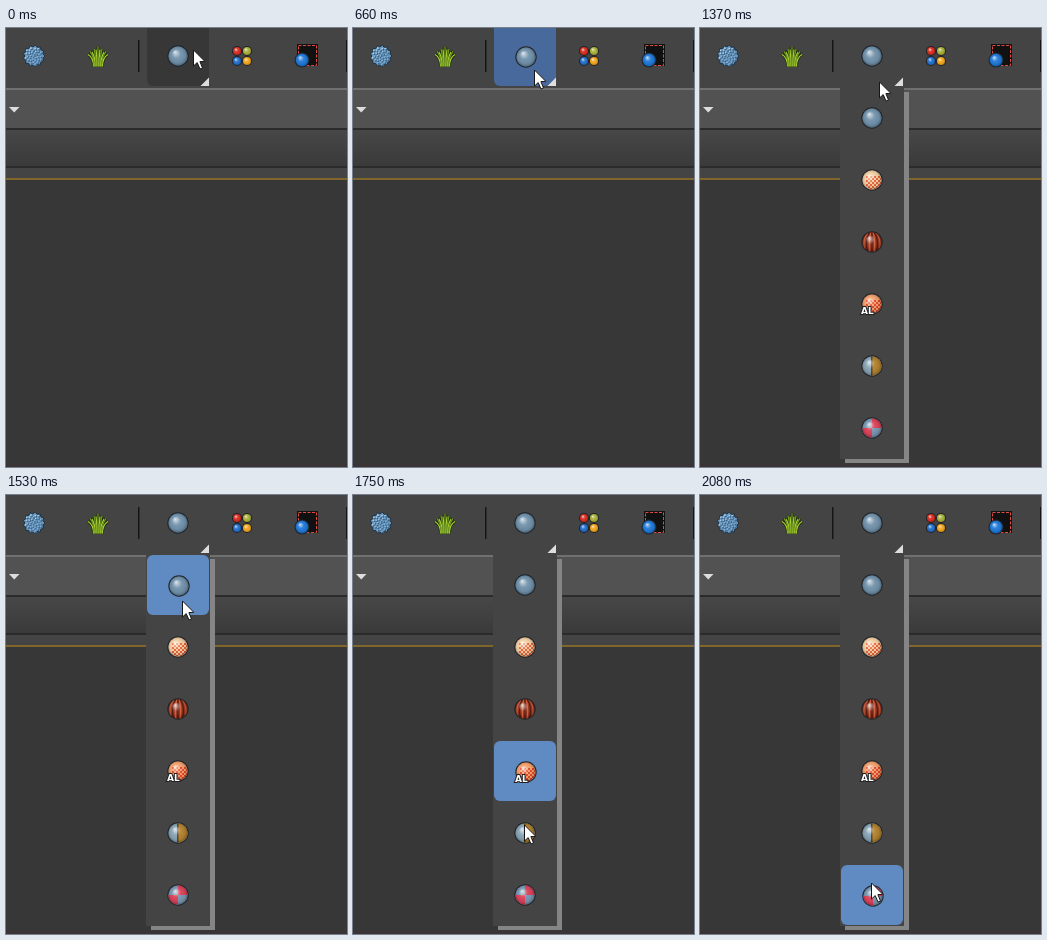
These frames come from a looping animation (341x439 px, 2160 ms). An HTML page with a canvas:

```html
<!DOCTYPE html>
<html lang="en">
<head>
<meta charset="utf-8">
<title>Material flyout</title>
<style>
html, body { margin: 0; height: 100%; overflow: hidden; background: #373737; }
canvas { display: block; }
</style>
</head>
<body>
<canvas id="stage" width="341" height="439"></canvas>
<script>
const ctx = document.getElementById('stage').getContext('2d');
const LOOP = 2160;
const CELL = 62;
const HOVER = '#373737', PRESSED = '#48699b', HOT = '#5f8ac2';

// start time, cursor tip, and what is open or lit
const steps = [
  { t: 0, x: 187.5, y: 22, button: HOVER },
  { t: 90, x: 181.5, y: 42, button: HOVER, tip: true },
  { t: 660, x: 181.5, y: 42, button: PRESSED },
  { t: 880, x: 181.5, y: 42, menu: true },
  { t: 1370, x: 179.5, y: 54, menu: true },
  { t: 1450, x: 176.5, y: 106, menu: true, hot: 1 },
  { t: 1540, x: 172.5, y: 178, menu: true, hot: 2 },
  { t: 1620, x: 171.5, y: 244, menu: true, hot: 3 },
  { t: 1750, x: 171.5, y: 330, menu: true, hot: 4 },
  { t: 1830, x: 171.5, y: 388, menu: true, hot: 5 },
  { t: 1910, x: 171.5, y: 388, menu: true, hot: 6 }
];

function rect(x, y, w, h, color) {
  ctx.fillStyle = color;
  ctx.fillRect(x, y, w, h);
}

function round(x, y, w, h, r, color) {
  ctx.fillStyle = color;
  ctx.beginPath();
  ctx.roundRect(x, y, w, h, r);
  ctx.fill();
}

function poly(points, fill, stroke) {
  ctx.beginPath();
  for (let i = 0; i < points.length; i += 2) ctx.lineTo(points[i], points[i + 1]);
  ctx.closePath();
  ctx.fillStyle = fill;
  ctx.fill();
  if (stroke) {
    ctx.strokeStyle = stroke;
    ctx.lineWidth = 1;
    ctx.stroke();
  }
}

function disc(x, y, r, color) {
  ctx.fillStyle = color;
  ctx.beginPath();
  ctx.arc(x, y, r, 0, 7);
  ctx.fill();
}

// Shaded ball; paint() adds a pattern centred on the origin.
function ball(x, y, r, color, paint) {
  ctx.save();
  ctx.translate(x, y);
  disc(0, 0, r + 0.7, '#20242a');
  ctx.beginPath();
  ctx.arc(0, 0, r - 0.3, 0, 7);
  ctx.clip();
  rect(-r, -r, 2 * r, 2 * r, color);
  if (paint) paint();
  const shade = ctx.createRadialGradient(-r * 0.3, -r * 0.4, 0, 0, 0, r);
  shade.addColorStop(0, 'rgba(255,255,255,.8)');
  shade.addColorStop(0.2, 'rgba(255,255,255,.45)');
  shade.addColorStop(0.45, 'rgba(255,255,255,.05)');
  shade.addColorStop(0.8, 'rgba(0,0,0,.08)');
  shade.addColorStop(1, 'rgba(0,0,0,.35)');
  rect(-r, -r, 2 * r, 2 * r, shade);
  ctx.restore();
}

function checks(color) {
  for (let i = -3; i < 5; i++)
    for (let j = -2; j < 5; j++)
      if ((i + j) % 2) rect(i * 2, j * 2, 2, 2, color);
}

function strands() {
  ctx.lineWidth = 1.2;
  for (let i = -4; i <= 4; i++) {
    ctx.strokeStyle = i % 2 ? '#d2603c' : '#4a150c';
    ctx.beginPath();
    ctx.moveTo(i, -10);
    ctx.quadraticCurveTo(i * 3.6, -3, i * 2.2, 10);
    ctx.stroke();
  }
}

const glass = (x, y) => ball(x, y, 10, '#7192ab');

const menuIcons = [
  glass,
  glass,
  (x, y) => ball(x, y, 10, '#f3cfa4', () => checks('#e8623a')),
  (x, y) => ball(x, y, 10, '#97331c', strands),
  (x, y) => {
    ball(x, y, 10, '#f4a06c', () => checks('#e0452a'));
    ctx.font = 'bold 9px "DejaVu Sans", sans-serif';
    ctx.lineWidth = 2;
    ctx.strokeStyle = '#222';
    ctx.strokeText('AL', x - 11, y + 10);
    ctx.fillStyle = '#fff';
    ctx.fillText('AL', x - 11, y + 10);
  },
  (x, y) => ball(x, y, 10, '#87a3b4', () => {
    rect(-1, -10, 12, 20, '#b4822c');
    rect(-1, -10, 1.5, 20, '#5b431d');
  }),
  (x, y) => ball(x, y, 10, '#7896b0', () => {
    rect(-10, 0, 10, 10, '#dc4058');
    rect(0, -10, 10, 10, '#dc4058');
  })
];

function bumpyBall(x, y) {
  const outline = [];
  for (let i = 0; i < 26; i++) {
    const a = i * Math.PI / 13, r = i % 2 ? 9.2 : 11;
    outline.push(x + r * Math.cos(a), y + r * Math.sin(a));
  }
  poly(outline, '#6595bd', '#23323e');
  for (let i = 0; i < 34; i++) {
    const a = i * 2.4, r = 1.5 * Math.sqrt(i);
    const px = x + r * Math.cos(a), py = y + r * Math.sin(a);
    disc(px + 0.6, py + 0.7, 1.1, '#3e668c');
    disc(px - 0.4, py - 0.4, 0.9, px + py < x + y ? '#a9cee8' : '#80aed3');
  }
}

function grass(x, y) {
  for (const pass of [0, 1])
    for (let i = -5; i <= 5; i++) {
      const tipX = x + i * 2, tipY = y - 10 + Math.abs(i) * 1.2 + (i & 1) * 2;
      ctx.strokeStyle = pass ? (i & 1 ? '#a9cf32' : '#6f9b20') : '#1d2b0b';
      ctx.lineWidth = pass ? 1.2 : 2.8;
      ctx.beginPath();
      ctx.moveTo(x + i * 0.9, y + 10);
      ctx.quadraticCurveTo(x + i * 0.9, y + 1, tipX, tipY);
      ctx.stroke();
    }
}

function drawToolbar() {
  rect(0, 0, 341, 439, '#373737');
  rect(0, 0, 341, 60, '#444');
  rect(0, 60, 341, 2, '#707070');
  rect(0, 62, 341, 38, '#525252');
  rect(0, 100, 341, 2, '#2b2b2b');
  const band = ctx.createLinearGradient(0, 102, 0, 138);
  band.addColorStop(0, '#474747');
  band.addColorStop(1, '#3a3a3a');
  rect(0, 102, 341, 36, band);
  rect(0, 138, 341, 2, '#2b2b2b');
  rect(0, 140, 341, 10, '#444');
  rect(0, 150, 341, 2, '#80662b');
  rect(0, 436, 341, 3, '#3a3436');
  for (const x of [132, 340]) rect(x, 12, 1.5, 32, '#161616');
  poly([3, 79, 13.5, 79, 8.25, 84.5], '#ddd');

  bumpyBall(28, 28);
  grass(92, 28.5);
  ball(231, 23, 4.4, '#d92d20');
  ball(241, 23, 4.4, '#a9b03a');
  ball(231, 33, 4.4, '#2470cc');
  ball(241, 33, 4.4, '#f2a51c');

  rect(291, 16, 21, 22, '#111');
  ctx.strokeStyle = '#e04a40';
  ctx.lineWidth = 1;
  ctx.setLineDash([3, 1.5]);
  ctx.strokeRect(292.5, 17.5, 18, 20);
  ctx.setLineDash([]);
  ball(296, 32, 6.8, '#1e78d8');
}

function drawMenu(hot) {
  rect(145, 64, 64, 371, '#858585');
  rect(140, 0, 64, 431, '#444');
  if (hot) round(141, hot * CELL - 2, 62, 60, 6, HOT);
  menuIcons.forEach((icon, i) => {
    const shift = i === hot ? 1 : 0;
    icon(172 + shift, 28 + i * CELL + shift);
  });
}

function drawButton(color) {
  round(141, -8, 62, 66, 6, color);
  const shift = color === PRESSED ? 1 : 0;
  glass(172 + shift, 28 + shift);
}

function drawTip() {
  round(89, 97, 176, 47, 6, 'rgba(0,0,0,.24)');
  round(84, 92, 176, 47, 6, '#858585');
  poly([162, 92.5, 172, 77.5, 182, 92.5], '#858585');
  ctx.font = '21px "Open Sans", "Noto Sans", sans-serif';
  ctx.textAlign = 'center';
  ctx.fillStyle = '#f4f4f4';
  ctx.fillText('K-Zun KZunMtl', 172, 124);
  ctx.textAlign = 'left';
}

function drawCursor(x, y) {
  poly([x, y, x, y + 16, x + 3.7, y + 12.6, x + 6.5, y + 19, x + 9, y + 18,
    x + 6.4, y + 11.6, x + 11.3, y + 11.3], '#fff', '#161616');
}

function frame() {
  const t = performance.now() % LOOP;
  const step = steps.findLast(s => s.t <= t);
  drawToolbar();
  if (step.menu) drawMenu(step.hot);
  else drawButton(step.button);
  poly([203, 49.5, 203, 58, 194.5, 58], '#dedede');
  if (step.tip) drawTip();
  drawCursor(step.x, step.y);
  requestAnimationFrame(frame);
}
frame();
</script>
</body>
</html>
```
